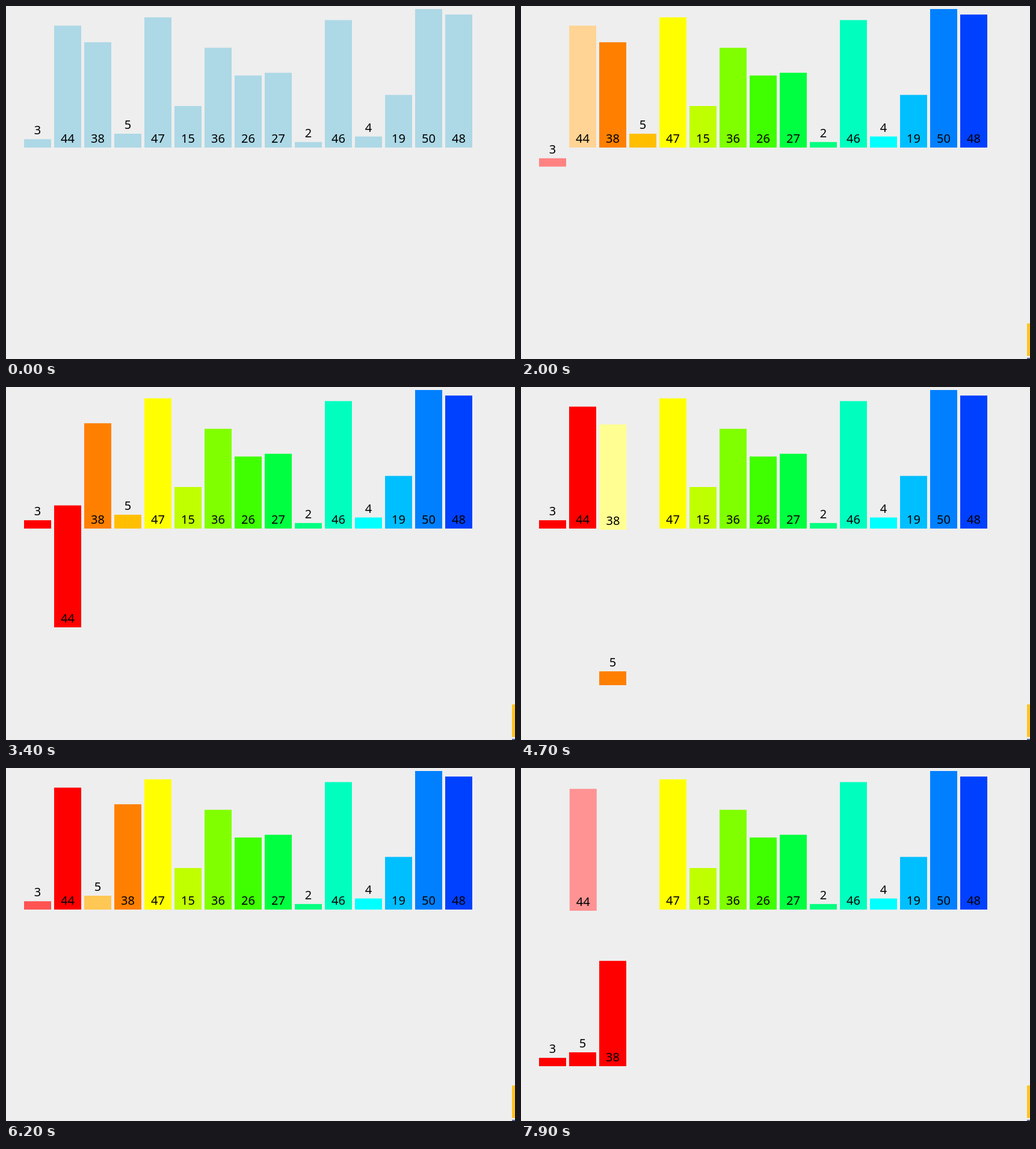
These frames come from a looping animation (846 px wide and 586 px high, 8 s). An HTML page with a canvas:

```html
<!DOCTYPE html>
<html lang="en">
<head>
<meta charset="utf-8">
<title>Merge sort</title>
<style>
html, body { margin: 0; width: 100%; height: 100%; overflow: hidden; background: #eee; }
canvas { display: block; }
</style>
</head>
<body>
<canvas id="stage" width="846" height="586"></canvas>
<script>
const ctx = document.getElementById('stage').getContext('2d');
const LOOP = 8000, TICK = 100, FADE = 250;
const BASE = 235, DROP = 260, UNIT = 4.6, PITCH = 50, WIDTH = 45;
const values = [3, 44, 38, 5, 47, 15, 36, 26, 27, 2, 46, 4, 19, 50, 48];

const hue = h => [5, 3, 1].map(n => {
  const k = (n + h / 60) % 6;
  return 255 - 255 * Math.max(0, Math.min(k, 4 - k, 1));
});
const bright = rgb => rgb.map(c => Math.min(255, c + 148));
const ease = t => t < 0.5 ? 4 * t ** 3 : 1 - 4 * (1 - t) ** 3;
const lerp = (a, b, p) => a + (b - a) * p;

const spectrum = values.map((_, i) => hue(15 * (i < 8 ? i : i + 1)));
const red = hue(0), orange = hue(30);

// Each step: start time, value of the bar, properties it moves to
const steps = [];
const step = (start, value, to) => steps.push({ start, value, to });
const glow = (start, value, rgb) => step(start, value, { rgb: bright(rgb) });
const down = (start, value, slot, rgb) => step(start, value, { slot, row: 1, rgb });
const up = (start, value) => step(start, value, { row: 0 });

values.forEach((v, i) => step(970, v, { rgb: spectrum[i] }));

glow(1470, 3, spectrum[0]);
glow(1470, 44, spectrum[1]);
down(1922, 3, 0, red);
down(2365, 44, 1, red);
up(2836, 3);
up(3287, 44);

glow(3770, 38, spectrum[2]);
glow(3770, 5, spectrum[3]);
down(4210, 5, 2, orange);
down(4669, 38, 3, orange);
up(5126, 5);
up(5587, 38);

glow(6070, 3, red);
glow(6070, 5, orange);
down(6487, 3, 0, red);
glow(6487, 44, red);
down(6945, 5, 1, red);
glow(6945, 38, orange);
down(7410, 38, 2, red);
down(7869, 44, 3, red);

function barAt(value, index, time) {
  const bar = { slot: index, row: 0, rgb: [173, 216, 230] };
  for (const { start, value: v, to } of steps) {
    if (v !== value || time < start) continue;
    const p = ease(Math.min(1, (time - start) / FADE));
    if ('slot' in to) bar.slot = lerp(bar.slot, to.slot, p);
    if ('row' in to) bar.row = lerp(bar.row, to.row, p);
    if (to.rgb) bar.rgb = bar.rgb.map((c, i) => lerp(c, to.rgb[i], p));
  }
  return bar;
}

function rect(color, x, y, w, h) {
  ctx.fillStyle = color;
  ctx.fillRect(x, y, w, h);
}

function draw() {
  // The picture advances in whole ticks
  const time = Math.floor(performance.now() % LOOP / TICK) * TICK;
  rect('#eee', 0, 0, 846, 586);
  ctx.font = '20px "Noto Sans", "Open Sans", sans-serif';
  ctx.textAlign = 'center';

  values.forEach((v, i) => {
    const { slot, row, rgb } = barAt(v, i, time);
    const x = 30 + slot * PITCH, bottom = BASE + row * DROP, h = v * UNIT;
    rect(`rgb(${rgb.map(Math.round)})`, x, bottom - h, WIDTH, h);
    ctx.fillStyle = '#000';
    ctx.fillText(v, x + WIDTH / 2, (v < 10 ? bottom - h : bottom) - 8);
  });

  if (time >= 500) {
    rect('#ffc41f', 841, 527, 5, 54);
    rect('#5f6b9c', 841, 584, 5, 2);
  }
  requestAnimationFrame(draw);
}
draw();
</script>
</body>
</html>
```
